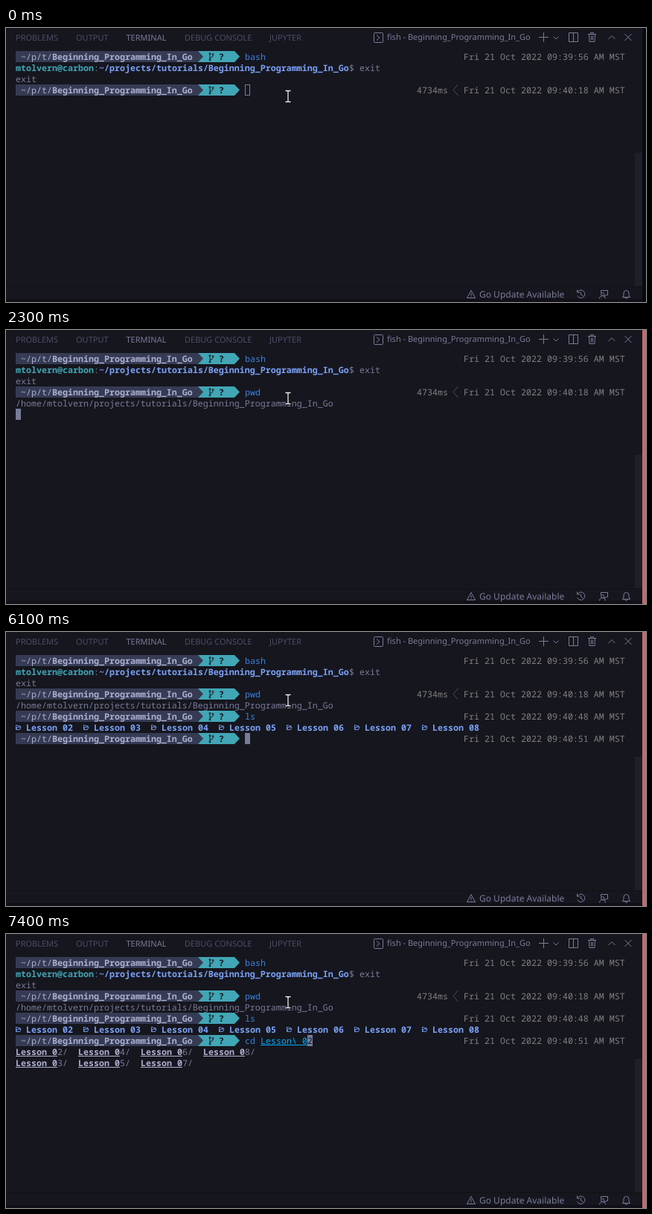
Recreate the animation shown at these times as an HTML page. Size 860x369 px, loop 8000 ms.

```html
<!DOCTYPE html>
<html lang="en">
<head>
<meta charset="utf-8">
<title>Terminal session</title>
<style>
  html, body { margin: 0; width: 100%; height: 100%; overflow: hidden; background: #16161e; }
  svg { display: block; width: 860px; height: 369px; }
  text { white-space: pre; text-rendering: geometricPrecision; }
  .mono { font: 11.667px "Noto Sans Mono", monospace; }
  .bold { font-weight: 700; }
  .ui { font: 11px "Noto Sans", sans-serif; }
  .icon { fill: none; stroke: #787c99; }
</style>
</head>
<body>
<svg viewBox="0 0 860 369">
  <rect width="860" height="369" fill="#16161e"/>
  <rect x="845" y="168" width="10" height="180" fill="#1e1f29"/>
  <path d="M0 348.5H855" stroke="#101014"/>
  <rect y="365" width="860" height="4" fill="#110f17"/>
  <rect id="edge" x="855" width="5" height="369"/>

  <g class="ui" fill="#4a4e66">
    <text x="13" y="17">PROBLEMS</text>
    <text x="94" y="17">OUTPUT</text>
    <text x="161.5" y="17" fill="#787c99">TERMINAL</text>
    <text x="240" y="17">DEBUG CONSOLE</text>
    <text x="354" y="17">JUPYTER</text>
    <text x="512" y="16" fill="#787c99">fish - Beginning_Programming_In_Go</text>
    <text x="636" y="363" fill="#787c99" font-size="12" style="font-size:12px">Go Update Available</text>
  </g>

  <g class="icon">
    <rect x="494.5" y="6.5" width="12" height="13" rx="1"/>
    <path d="M498 9.5l4 3.5-4 3.5"/>
    <path d="M716 12.5h13M722.5 6v13"/>
    <path d="M735.5 11.5l3.5 3.5 3.5-3.5"/>
    <path d="M756.5 6.5h12v12h-12zM762.5 6.5v12"/>
    <path d="M782 8.5h11M785.5 8v-1.5h4v1.5M783.5 9l.5 9.5h7l.5-9.5M786.5 10.500v6M788.500 10.500v6"/>
    <path d="M809.5 15l4.500-4.500 4.500 4.500"/>
    <path d="M831.500 8l9 9M840.500 8l-9 9"/>
    <path d="M625 353.500l5.500 10h-11zM625 357v3.500M625 361.200v1"/>
    <path d="M768 355.500a5.300 5.300 0 1 1-.3 5M767.500 352.500v3.500h3.500M772.500 355.500v3.500l3 2"/>
    <path d="M799.500 356.500v-3h9v6h-2l-2 2v-2"/>
    <circle cx="801.500" cy="358.500" r="2"/>
    <path d="M797.500 364.500c0-5 8-5 8 0"/>
    <path d="M828.500 362.500h10l-1.500-2.500v-3a3.500 3.500 0 0 0-7 0v3zM832 363a1.500 1.500 0 0 0 3 0"/>
  </g>

  <g id="term" class="mono"></g>

  <path d="M375.500 84.500h2.500l1 1 1-1h2.500M379 85.500v13M375.500 99.500h2.500l1-1 1 1h2.500"
        fill="none" stroke="#08080c" stroke-width="3"/>
  <path d="M375.500 84.500h2.500l1 1 1-1h2.500M379 85.500v13M375.500 99.500h2.500l1-1 1 1h2.500"
        fill="none" stroke="#f2f2f2" stroke-width="1.300"/>
</svg>

<script>
const LOOP = 8000, CELL = 7, ROW = 15, LEFT = 13, TOP = 31, INPUT = 44;
const BG = '#16161e', FG = '#787c99', DARK = '#363b54', TEAL = '#41a6b5', PALE = '#acb0d0',
      BLUE = '#7aa2f7', CMD = '#3a82e0', PARAM = '#00afff', ERR = '#8a4832', GREY = '#808080';
const DIR = 'Beginning_Programming_In_Go';
const LESSONS = [2, 3, 4, 5, 6, 7, 8];

const px = col => LEFT + col * CELL;
const py = row => TOP + row * ROW;

const put = (col, row, str, color = FG, cls = '') =>
  `<text x="${px(col)}" y="${py(row) + 12}" fill="${color}" class="${cls}">${str}</text>`;
const box = (col, row, cells, color) =>
  `<rect x="${px(col)}" y="${py(row)}" width="${cells * CELL}" height="${ROW}" fill="${color}"/>`;
const arrow = (col, row, color) =>
  `<path d="M${px(col)} ${py(row)}l7 7.500-7 7.500z" fill="${color}"/>`;
const line = (col, row, cells, color) =>
  `<path d="M${px(col)} ${py(row) + 13.5}h${cells * CELL}" stroke="${color}"/>`;
const cursor = (col, row, char = '') => box(col, row, 1, FG) + put(col, row, char, BG);

function prompt(row, time) {
  const x = px(37), y = py(row);
  return box(0, row, 35, DARK) + box(35, row, 7, TEAL) + arrow(35, row, DARK) + arrow(42, row, TEAL) +
    put(1, row, '~/p/t/', PALE) + put(7, row, DIR, PALE, 'bold') +
    `<g fill="none" stroke="${BG}"><path d="M${x + 2} ${y + 4}v8M${x + 6} ${y + 5}v1.500q0 2-4 3"/>
     <circle cx="${x + 2}" cy="${y + 3.5}" r="1"/><circle cx="${x + 6}" cy="${y + 4.5}" r="1"/>
     <circle cx="${x + 2}" cy="${y + 12}" r="1"/></g>` +
    put(39, row, '?', BG, 'bold') +
    put(86, row, `Fri 21 Oct 2022 09:${time} AM MST`, GREY);
}

// Typed text, block cursor over the first suggested character, then the rest of the suggestion.
function typing(row, typed, color, hint = '') {
  const at = INPUT + typed.length;
  return put(INPUT, row, typed, color) + cursor(at, row, hint[0]) + put(at + 1, row, hint.slice(1));
}

const history = () =>
  prompt(0, '39:56') + put(INPUT, 0, 'bash', CMD) +
  put(0, 1, 'mtolvern@carbon', TEAL, 'bold') + put(15, 1, ':') +
  put(16, 1, '~/projects/tutorials/' + DIR, BLUE, 'bold') + put(64, 1, '$ exit') +
  put(0, 2, 'exit') +
  prompt(3, '40:18') + put(77, 3, '4734ms', GREY) +
  `<path d="M${px(85) - .5} ${py(3)}l-6.500 7.500 6.500 7.500" fill="none" stroke="#4b4d5c"/>`;

const pwdDone = () => put(INPUT, 3, 'pwd', CMD) + put(0, 4, '/home/mtolvern/projects/tutorials/' + DIR);

const folder = (col, row) =>
  `<path d="M${px(col) + .5} ${py(row) + 10.5}v-6h2l1 1h2.500v1.500M${px(col) + .5} ${py(row) + 10.5}l1.500-3.500h5l-1.500 3.500z"
    fill="none" stroke="${BLUE}" stroke-width=".9"/>`;

const lsDone = () => put(INPUT, 5, 'ls', CMD) + prompt(7, '40:51') +
  LESSONS.map((n, i) => folder(i * 13, 6) + put(i * 13 + 2, 6, 'Lesson 0' + n, BLUE, 'bold')).join('');

const completed = char => put(INPUT, 7, 'cd', CMD) + put(47, 7, 'Lesson\\ 0', PARAM) +
  line(47, 7, 9, PARAM) + cursor(56, 7, char);

const choices = () => LESSONS.map((n, i) => {
  const col = (i >> 1) * 12, row = 8 + i % 2;
  return put(col, row, 'Lesson 0', PALE, 'bold') + line(col, row, 8, PALE) + put(col + 8, row, n + '/');
}).join('');

// [start time, what the input area shows from then on]
const steps = [
  [0, () => `<rect x="${px(INPUT) + .5}" y="${py(3) + .5}" width="6" height="14" fill="none" stroke="${FG}"/>`],
  [500, () => cursor(INPUT, 3)],
  [1800, () => typing(3, 'p', ERR, 'wd')],
  [1900, () => typing(3, 'pw', ERR, 'd')],
  [2000, () => typing(3, 'pwd', CMD)],
  [2300, () => pwdDone() + cursor(0, 5)],
  [2400, () => typing(5, '', FG)],
  [5800, () => typing(5, 'l', FG)],
  [5900, () => typing(5, 'ls', CMD)],
  [6100, () => typing(7, '', FG)],
  [6500, () => typing(7, 'c', ERR, 'd ..')],
  [6600, () => typing(7, 'cd', CMD, ' ..')],
  [6700, () => typing(7, 'cd ', CMD, '..')],
  [7000, () => completed('')],
  [7400, () => completed('2') + choices()],
];

const term = document.getElementById('term'), edge = document.getElementById('edge');
let shown, start;

function draw(now) {
  start ??= now;
  const t = (now - start) % LOOP;
  const step = steps.findLast(s => s[0] <= t);
  if (step !== shown) {
    shown = step;
    edge.setAttribute('fill', t < 500 ? '#080a12' : '#bf6b6e');
    term.innerHTML = history() +
      (t >= 2400 ? pwdDone() + prompt(5, '40:48') : '') +
      (t >= 6100 ? lsDone() : '') + step[1]();
  }
  requestAnimationFrame(draw);
}
requestAnimationFrame(draw);
</script>
</body>
</html>
```
